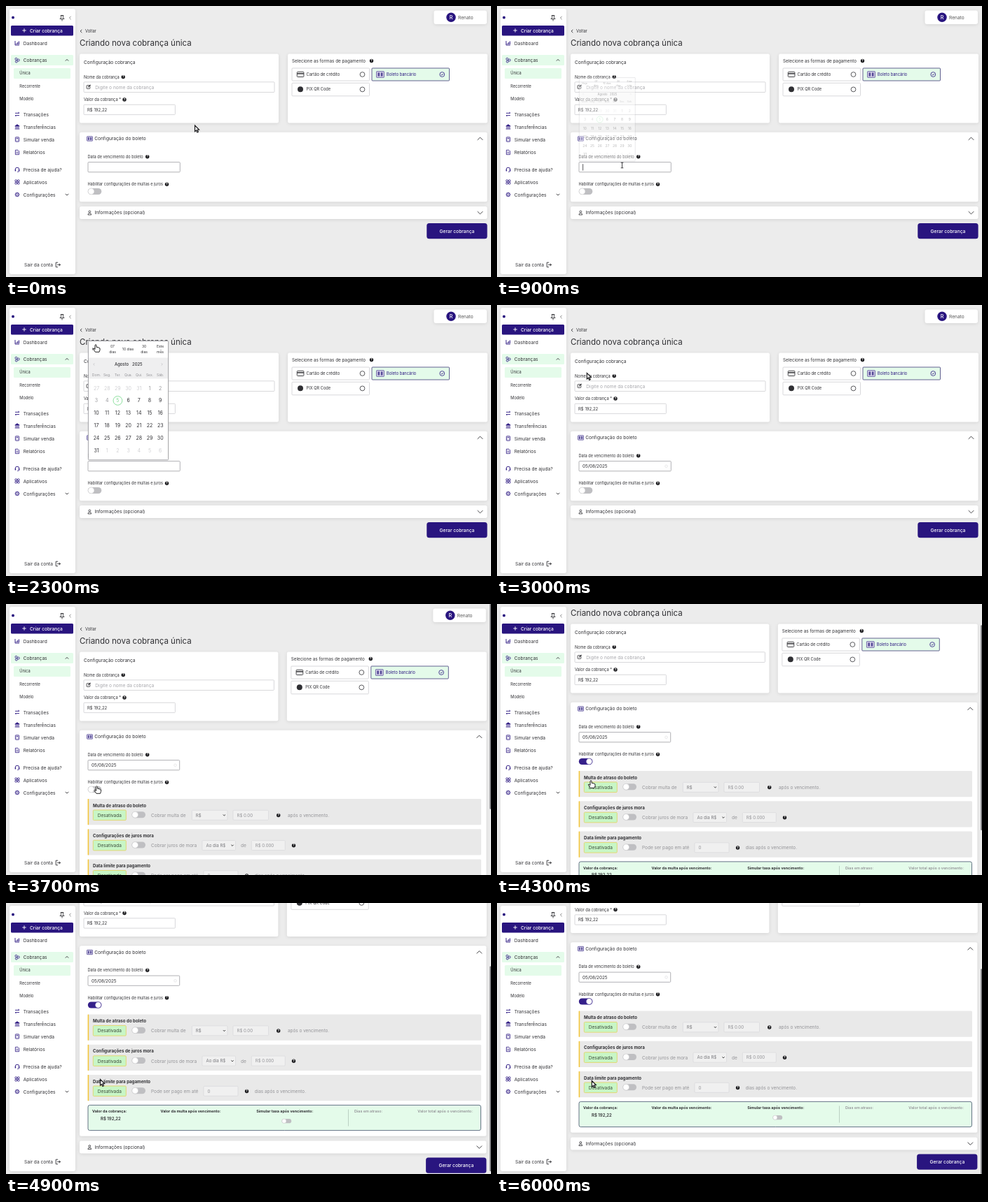
These frames come from a looping animation (692x388 px, 6.1 s). An HTML page with a canvas:

```html
<!DOCTYPE html>
<html lang="pt-BR">
<head>
<meta charset="utf-8">
<title>Criando nova cobrança</title>
<style>
html, body { margin: 0; width: 100%; height: 100%; overflow: hidden; background: #ececec; }
canvas { display: block; width: 692px; height: 388px; }
</style>
</head>
<body>
<canvas id="stage"></canvas>
<script>
const W = 692, H = 388, LOOP = 6100, STEP = 100;
const INK = '#303034', GRAY = '#939397', LINE = '#cfcfd2', NAVY = '#29157f', MINT = '#e4fbea', BG = '#ececec';
const canvas = document.getElementById('stage');
const c = canvas.getContext('2d');
const dpr = window.devicePixelRatio || 1;
canvas.width = W * dpr;
canvas.height = H * dpr;

const clamp = v => Math.max(0, Math.min(1, v));

// Keys are [time, value, value...]
function track(keys, t, ease = u => u) {
  let i = 0;
  while (i < keys.length - 1 && keys[i + 1][0] <= t) i++;
  const a = keys[i], b = keys[i + 1];
  if (!b) return a.slice(1);
  const u = ease(clamp((t - a[0]) / (b[0] - a[0])));
  return a.slice(1).map((v, k) => v + (b[k + 1] - v) * u);
}
const smooth = u => u * u * (3 - 2 * u);

const POINTER = [
  [0, 269.5, 171], [100, 269.5, 171], [700, 178.5, 228], [1000, 178.5, 228], [1400, 160, 175],
  [2100, 130, 72], [2200, 128, 57], [2800, 128, 57], [3500, 129.5, 261], [3900, 129.5, 261],
  [4200, 134, 253], [4700, 134, 253], [4800, 134.5, 252.5], [5200, 134.5, 252.5], [5300, 135.3, 254.5]
];
const SCROLL = [
  [0, 0], [4000, 0], [4100, 9], [4200, 30], [4300, 40], [4700, 40],
  [4800, 86], [4900, 119.5], [5000, 124], [5100, 124.5]
];

function text(s, x, y, size = 6.6, color = INK, weight = 400, align = 'left') {
  c.font = `${weight} ${size}px Inter, "Open Sans", sans-serif`;
  c.fillStyle = color;
  c.textAlign = align;
  c.fillText(s, x, y + size * 0.39);
}

function box(x, y, w, h, r, fill, stroke, lw = 0.8) {
  c.beginPath();
  c.roundRect(x, y, w, h, r);
  if (fill) { c.fillStyle = fill; c.fill(); }
  if (stroke) { c.strokeStyle = stroke; c.lineWidth = lw; c.stroke(); }
}

function disc(x, y, r, fill, stroke, lw = 0.8) {
  box(x - r, y - r, 2 * r, 2 * r, r, fill, stroke, lw);
}

function path(points, color = INK, lw = 0.9, fill) {
  c.beginPath();
  for (let i = 0; i < points.length; i += 2) c.lineTo(points[i], points[i + 1]);
  if (fill) { c.closePath(); c.fillStyle = fill; c.fill(); }
  c.strokeStyle = color;
  c.lineWidth = lw;
  c.stroke();
}

function chevron(x, y, w, h, color = INK, lw = 0.9) {
  path([x - w, y - h, x, y + h, x + w, y - h], color, lw);
}

function back(x, y, s, color = INK) {
  path([x + s, y - 2 * s, x - s, y, x + s, y + 2 * s], color, 0.9);
}

function shadow(on) {
  c.shadowColor = on ? 'rgba(0,0,0,.1)' : 'transparent';
  c.shadowBlur = on ? 5 * dpr : 0;
  c.shadowOffsetY = on ? dpr : 0;
}

function card(x, y, w, h, r = 2.5) {
  shadow(true);
  box(x, y, w, h, r, '#fff');
  shadow(false);
}

function help(x, y) {
  disc(x, y, 2.7, '#1d1d20');
  text('?', x, y - 0.2, 4.4, '#fff', 700, 'center');
}

function toggle(x, y, p = 0, s = 1) {
  box(x, y - 4.5 * s, 19.5 * s, 9 * s, 4.5 * s, p > 0.5 ? '#35208a' : '#bfbfc2');
  disc(x + (4.7 + 10 * p) * s, y, 4.4 * s, '#fff', p > 0.5 ? '#35208a' : '#c9c9cb', 0.6);
}

function slip(x, y, s = 1) {
  const tone = '#564a98';
  box(x - 4 * s, y - 3.2 * s, 8 * s, 6.4 * s, 0.5, '#dcd9ec', tone, 0.8);
  box(x - 2.6 * s, y - 1.9 * s, 2 * s, 3.8 * s, 0, tone);
  box(x + 0.6 * s, y - 1.9 * s, 2 * s, 3.8 * s, 0, tone);
}

function person(x, y) {
  disc(x, y - 1.5, 1.4, null, INK, 0.8);
  c.beginPath();
  c.arc(x, y + 3, 2.4, Math.PI, 0);
  c.closePath();
  c.stroke();
}

const icons = {
  chart(x, y) {
    path([x - 3, y - 3, x - 3, y + 3, x + 3, y + 3], NAVY, 0.9);
    [1.5, 3, 4.5].forEach((h, i) => path([x - 1.2 + i * 1.8, y + 2, x - 1.2 + i * 1.8, y + 2 - h], NAVY, 1));
  },
  coins(x, y) {
    disc(x - 1.5, y - 1.7, 1.5, null, NAVY);
    disc(x + 1.8, y, 1.5, null, NAVY);
    disc(x - 1.2, y + 2, 1.5, null, NAVY);
  },
  swap(x, y) {
    path([x + 1.5, y - 3, x + 3, y - 1.6, x - 3, y - 1.6], NAVY);
    path([x - 1.5, y + 3, x - 3, y + 1.6, x + 3, y + 1.6], NAVY);
  },
  bank(x, y) {
    path([x - 3.2, y - 1, x, y - 3.3, x + 3.2, y - 1], NAVY, 0.8, NAVY);
    [-2, 0, 2].forEach(d => path([x + d, y - 0.5, x + d, y + 2.3], NAVY, 0.9));
    path([x - 3.3, y + 3, x + 3.3, y + 3], NAVY, 0.9);
  },
  calc(x, y) {
    box(x - 2.6, y - 3.2, 5.2, 6.4, 0.6, null, NAVY);
    path([x - 1.5, y - 1.5, x + 1.5, y - 1.5], NAVY, 0.9);
    [0.4, 1.9].forEach(d => [-1.3, 0, 1.3].forEach(k => disc(x + k, y + d, 0.4, NAVY)));
  },
  file(x, y) {
    path([x - 2.6, y - 3.2, x + 1, y - 3.2, x + 2.6, y - 1.6, x + 2.6, y + 3.2, x - 2.6, y + 3.2, x - 2.6, y - 3.2], NAVY, 0.8);
    [-0.5, 1.2].forEach(d => path([x - 1.4, y + d, x + 1.4, y + d], NAVY, 0.7));
  },
  headset(x, y) {
    c.beginPath();
    c.arc(x, y, 2.8, Math.PI, 0);
    c.strokeStyle = NAVY;
    c.lineWidth = 0.9;
    c.stroke();
    [-3.3, 1.9].forEach(d => box(x + d, y, 1.4, 2.5, 0.5, NAVY));
    path([x + 2.8, y + 2, x + 2, y + 3.4, x, y + 3.4], NAVY, 0.7);
  },
  grid(x, y) {
    [-3, 0.5].forEach(i => [-3, 0.5].forEach(j => box(x + i, y + j, 2.5, 2.5, 0.4, null, NAVY)));
  },
  gear(x, y) {
    for (let i = 0; i < 8; i++) {
      const a = i * Math.PI / 4;
      path([x + 2.2 * Math.cos(a), y + 2.2 * Math.sin(a), x + 3.3 * Math.cos(a), y + 3.3 * Math.sin(a)], NAVY, 1.1);
    }
    disc(x, y, 2.3, null, NAVY, 0.9);
    disc(x, y, 0.7, NAVY);
  }
};

const MENU = [
  ['chart', 'Dashboard', 53], ['coins', 'Cobranças', 77.5], ['swap', 'Transações', 155],
  ['bank', 'Transferências', 173], ['calc', 'Simular venda', 191], ['file', 'Relatórios', 209.5],
  ['headset', 'Precisa de ajuda?', 234], ['grid', 'Aplicativos', 252], ['gear', 'Configurações', 270]
];

function sidebar() {
  card(5, 4, 94, 380, 3);
  disc(10, 16.5, 2, NAVY);
  path([77.8, 13.5, 82.2, 13.5], INK, 1);
  path([78.6, 13.5, 78.6, 16.5, 77, 18.4, 83, 18.4, 81.4, 16.5, 81.4, 13.5], INK, 0.9);
  path([80, 18.4, 80, 21.5], INK, 0.9);
  back(91.5, 17, 1.1, '#777');
  box(7, 28, 89, 14.5, 1.5, NAVY);
  path([23.3, 35, 28.7, 35], '#fff', 0.9);
  path([26, 32.3, 26, 37.7], '#fff', 0.9);
  text('Criar cobrança', 34, 35, 6.6, '#fff', 500);
  box(7, 70, 89, 15, 1.5, MINT);
  box(11, 89, 81, 15, 1.5, MINT);
  for (const [icon, label, y] of MENU) {
    icons[icon](16, y);
    text(label, 24.7, y);
  }
  ['Única', 'Recorrente', 'Modelo'].forEach((s, i) => text(s, 19.3, 96.2 + i * 18.2, 5.7));
  chevron(87, 77.5, 2.2, -1.1);
  chevron(87, 270, 2.2, 1.1);
  text('Sair da conta', 26, 370.5);
  path([74, 367.2, 71.2, 367.2, 71.2, 373.8, 74, 373.8], INK, 0.9);
  path([73.2, 370.5, 77.5, 370.5], INK, 0.9);
  path([75.7, 368.6, 77.6, 370.5, 75.7, 372.4], INK, 0.9);
}

function payments(x) {
  card(x, 68.5, 285, 99);
  text('Selecione as formas de pagamento', x + 6, 78.5, 6.3);
  help(x + 119.5, 78.5);
  box(x + 6, 89, 110.5, 18, 1, '#fff', LINE);
  box(x + 120, 89, 110.5, 18, 1, MINT, '#3f3a78', 0.8);
  box(x + 6, 110.3, 110.5, 18.5, 1, '#fff', LINE);
  box(x + 13.3, 94.3, 9.6, 7.2, 1, null, INK, 0.9);
  path([x + 13.3, 96.8, x + 22.9, 96.8], INK, 1.5);
  text('Cartão de crédito', x + 26.5, 97.8, 5.8);
  slip(x + 132, 98, 1.35);
  text('Boleto bancário', x + 141, 97.8, 5.7, NAVY);
  disc(x + 18, 119.3, 4, '#2f2f33');
  text('PIX QR Code', x + 26.5, 119.1, 5.7);
  disc(x + 106.5, 98, 3.4, '#fff', INK);
  disc(x + 106.5, 119.4, 3.4, '#fff', INK);
  disc(x + 220.3, 98, 3.4, null, NAVY);
  path([x + 218.8, 98, x + 220, 99.2, x + 222, 97], NAVY, 0.8);
}

function charge(w) {
  card(105, 68.5, w, 99);
  text('Configuração cobrança', 111, 80.8);
  text('Nome da cobrança', 111, 101.6, 5.65);
  help(167.2, 101.6);
  box(111, 108.8, w - 12, 14.7, 1, '#fff', LINE);
  box(115, 113.6, 4.8, 4.8, 0.7, null, INK, 0.8);
  path([117, 116.4, 120.6, 112.9], INK, 1.2);
  text('Digite o nome da cobrança', 127.3, 116.2, 6.6, '#a5a5aa');
  text('Valor da cobrança *', 111, 134, 5.65);
  help(169, 134);
  box(111, 141.3, 130.4, 14.3, 1, '#fff', LINE);
  text('R$ 192,22', 116, 148.6, 6);
}

function field(x, y, w, s, select) {
  box(x, y - 7, w, 14, 1, '#f0f0f0', '#d9d9db', 0.7);
  text(s, x + 5.5, y, 6.1, select ? '#77777b' : GRAY);
  if (select) chevron(x + w - 4.5, y, 1.6, 0.8, '#333', 1);
}

function panel(y, title, label) {
  box(117, y, 561, 37.3, 1.5, '#e9e9e9');
  box(116.6, y, 1.6, 37.3, 0.6, '#f3c63c');
  text(title, 124, y + 9.3, 6.15, INK, 700);
  box(124.3, y + 16, 47, 14.6, 1.2, '#c8f6c6', '#e2d873', 1);
  text('Desativada', 147.8, y + 23.3, 6.5, '#3b4a3b', 400, 'center');
  toggle(179.5, y + 22.7);
  text(label, 207, y + 23.3, 6.5, GRAY);
}

function fines() {
  panel(279, 'Multa de atraso do boleto', 'Cobrar multa de');
  field(265.3, 302.3, 50.6, 'R$', true);
  field(324, 302.3, 50.5, 'R$ 0.00');
  help(388.7, 302.5);
  text('após o vencimento.', 402, 302.3, 6.4, GRAY);

  panel(322.3, 'Configurações de juros mora', 'Cobrar juros de mora');
  field(280, 345.6, 47.5, 'Ao dia R$', true);
  text('de', 335, 345.6, 6.5, GRAY);
  field(350.3, 345.6, 48, 'R$ 0.000');
  help(410.5, 345.8);

  panel(365.5, 'Data limite para pagamento', 'Pode ser pago em até');
  field(282, 388.8, 49, '0');
  help(343.5, 389);
  text('dias após o vencimento.', 354.7, 388.8, 6.4, GRAY);

  box(117, 408.9, 560.5, 36.2, 2.5, MINT, '#55647a', 0.9);
  text('Valor da cobrança:', 123, 417.8, 5.4, INK, 700);
  text('R$ 192,22', 135, 427.8, 6, INK, 600);
  text('Valor da multa após vencimento:', 220.5, 417.8, 5.4, INK, 700);
  text('Simular taxa após vencimento:', 357.3, 417.8, 5.4, INK, 700);
  toggle(393.5, 431.7, 0, 0.7);
  path([488.5, 415, 488.5, 439], '#a9bdb0', 0.7);
  text('Dias em atraso:', 497, 417.8, 5.4, GRAY, 600);
  text('Valor total após o vencimento:', 587.3, 417.8, 5.4, GRAY, 600);
}

function page(t) {
  const open = t >= 3700, dx = open ? -1.2 : 0, grow = open ? 173 : 0;
  const right = 686.6 + dx;

  card(610.5 + dx, 6.5, 75.5, 19.5, 3);
  disc(635 + dx, 16.3, 6.7, NAVY);
  text('R', 635 + dx, 16.1, 7.2, '#fff', 500, 'center');
  text('Renato', 645 + dx, 16.1, 6.6, '#555');

  back(107.2, 36, 1.1);
  text('Voltar', 113, 36, 5.7);
  text('Criando nova cobrança única', 105, 52.1, 11.5);
  charge(284 + dx / 2);
  payments(402 + dx);

  card(105, 180.7, right - 105, 99.5 + grow);
  slip(119.5, 190);
  text('Configuração do boleto', 126.2, 189.8);
  chevron(676.5 + dx, 190, 3.8, -1.9);
  text('Data de vencimento do boleto', 116.5, 215.8, 5.6);
  help(201.7, 215.8);
  box(117, 223.6, 131.3 + dx / 2, 14.2, 1, '#fff', '#a9a9ad', 0.9);
  if (t >= 2500) {
    text('05/08/2025', 122, 230.6, 6.3);
    disc(241.5, 230.8, 1.8, null, '#dedee0', 0.7);
  } else if (t >= 800 && (t - 800) % 1000 < 500) {
    path([122.6, 226.2, 122.6, 235.6], INK, 0.8);
  }
  text('Habilitar configurações de multas e juros', 116.5, 255.2, 5.55);
  help(229.5, 255.2);
  toggle(116.8, 265.5, clamp((t - 3700) / 200));
  if (open) fines();

  card(105, 287 + grow, right - 105, 18);
  person(119.3, 296 + grow);
  text('Informações (opcional)', 126.4, 295.8 + grow);
  chevron(676.5 + dx, 296 + grow, 3.8, 1.9);
  box(600.3 + dx, 311 + grow, right - 600.3 - dx, 22.2, 3.5, NAVY);
  text('Gerar cobrança', 643.5 + dx, 322 + grow, 6.7, '#fff', 500, 'center');
}

function calendar(p) {
  if (p <= 0) return;
  const s = 0.55 + 0.45 * p, mid = (str, x, y, size, color, weight) => text(str, x, y, size, color, weight, 'center');
  c.save();
  c.globalAlpha = p;
  c.translate(117, 222);
  c.scale(s, s);
  c.translate(-117, -222);
  box(117.4, 51.4, 114.2, 170.4, 1, '#fff', '#97979b', 0.9);
  box(118, 75.5, 113, 30, 0, '#efeff0');
  mid('Hoje', 128.5, 63, 5);
  mid('10 dias', 174, 63, 5);
  [[152, '07', 'dias'], [197, '30', 'dias'], [220, 'Este', 'mês']].forEach(([x, a, b]) => {
    mid(a, x, 59.3, 5);
    mid(b, x, 66.7, 5);
  });
  text('Agosto', 155, 85, 5.9, INK, 500);
  text('2025', 180, 85, 5.9, INK, 500);
  back(125.5, 85, 0.8, '#c5c5c8');
  back(222.5, 85, -0.8, '#c5c5c8');
  ['Dom', 'Seg', 'Ter', 'Qua', 'Qui', 'Sex', 'Sáb'].forEach((d, i) => mid(d + '.', 129 + i * 15.2, 99.6, 5, GRAY));
  for (let i = 0; i < 42; i++) {
    const day = i - 4, x = 129 + i % 7 * 15.2, y = 119 + Math.floor(i / 7) * 17.9;
    const inside = day > 0 && day < 32;
    const n = day < 1 ? day + 31 : day > 31 ? day - 31 : day;
    if (day === 5) disc(x, y, 6.4, null, '#7fdc93', 0.9);
    mid(String(n), x, y - 0.2, 7, !inside ? '#d0d0d3' : day < 5 ? '#98989c' : day === 5 ? '#86d996' : INK);
  }
  c.restore();
}

function arrow() {
  path([0, 0, 0, 8.6, 2, 6.9, 3.4, 10, 4.9, 9.3, 3.5, 6.3, 6, 6.1], '#1c1c1e', 1.2, '#fff');
}

function beam() {
  path([-1.8, -3.8, 1.8, -3.8], INK, 0.9);
  path([0, -3.8, 0, 3.8], INK, 0.9);
  path([-1.8, 3.8, 1.8, 3.8], INK, 0.9);
}

function hand() {
  c.lineJoin = 'round';
  path([-1, 0.4, 0, -0.3, 1, 0.4, 1.2, 3.4, 3, 3.6, 4.8, 4.2, 6, 5, 6, 7.5, 5, 10.3, -0.6, 10.3, -2.2, 8, -3.8, 5.8, -3, 5, -1, 6.5], '#222', 1, '#fff');
  c.lineJoin = 'miter';
}

function pointer(t) {
  const shape = t < 700 ? arrow : t < 1100 ? beam : t < 2600 ? hand : t < 3300 ? arrow : t < 4500 ? hand : arrow;
  const [x, y] = track(POINTER, t, smooth);
  c.save();
  c.translate(x, y);
  shape();
  c.restore();
}

function draw(t) {
  const [top] = track(SCROLL, t);
  c.setTransform(dpr, 0, 0, dpr, 0, 0);
  c.fillStyle = BG;
  c.fillRect(0, 0, W, H);
  c.save();
  c.translate(0, -top);
  page(t);
  c.restore();
  sidebar();
  if (t >= 3700) box(690.2, top * 0.757, 2.2, 293.7, 1, '#77777a');
  calendar(Math.min(clamp((t - 850) / 150), clamp((2650 - t) / 150)));
  pointer(t);
}

const start = performance.now();
function frame() {
  const t = (performance.now() - start) % LOOP;
  draw(Math.floor(t / STEP) * STEP);
  requestAnimationFrame(frame);
}
frame();
</script>
</body>
</html>
```
